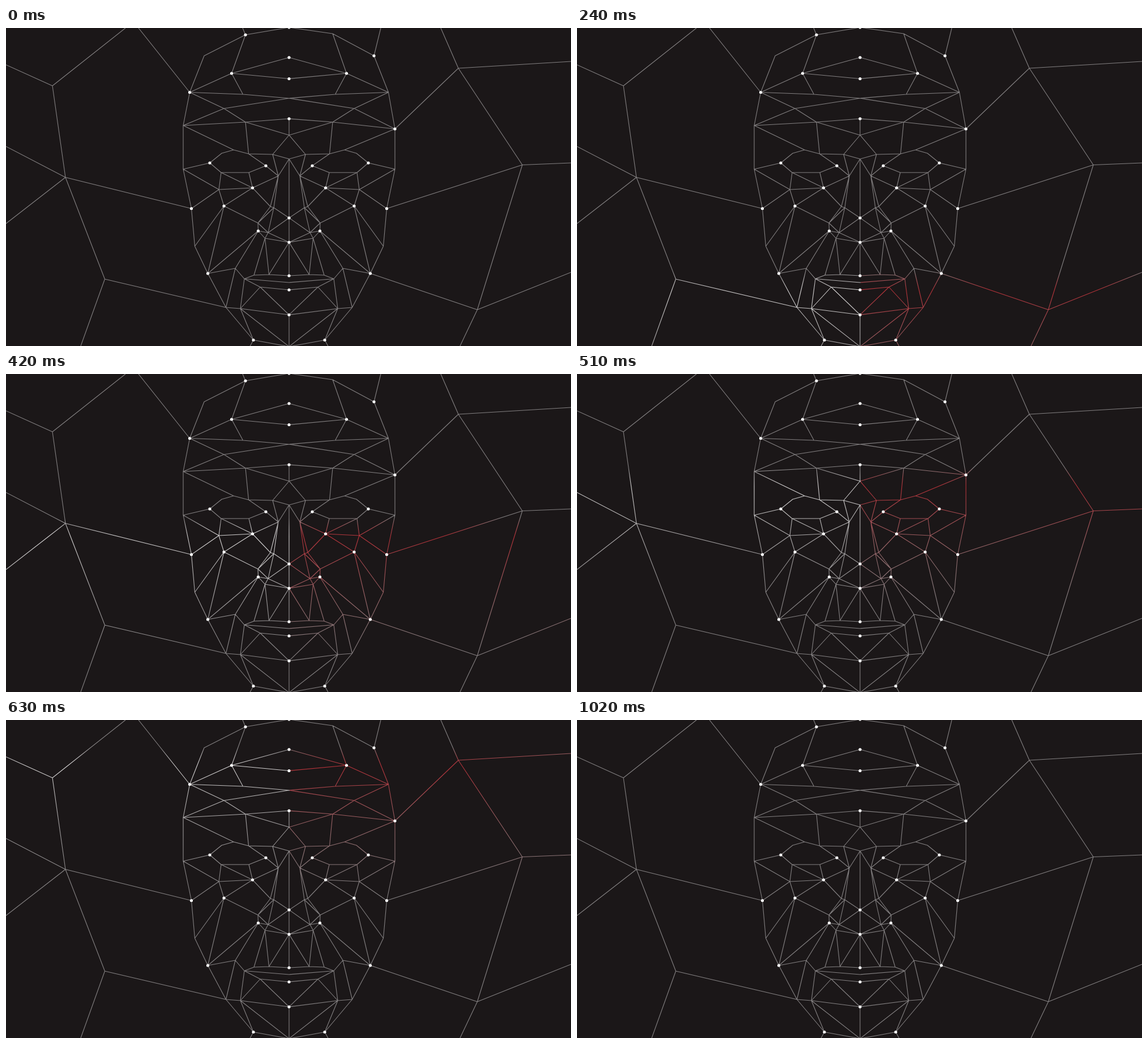
These frames come from a looping animation (998 px wide and 561 px high, 2280 ms). An HTML page with a canvas:

```html
<!DOCTYPE html>
<html lang="en">
<head>
<meta charset="utf-8">
<title>Face mesh scan</title>
<style>
  html, body { margin: 0; width: 100%; height: 100%; overflow: hidden; background: #1b1718; }
  canvas { display: block; }
</style>
</head>
<body>
<canvas id="stage" width="998" height="561"></canvas>
<script>
const W = 998, H = 561, MID = 500, LOOP = 2280, STEP = 30, TAIL = 265;
const ctx = document.getElementById('stage').getContext('2d');

// Heights of the points on the face's axis, named A to N
const axis = [-1, 52, 89.5, 124, 160, 189, 231, 335, 378, 437, 449, 462, 506, 562];

// Points beside the axis: distance from it, height, optional tilt between the sides
const half = {
  a: [77, 11, -1], b: [150, 49], c: [175.5, 113.5], d: [187, 175, 3], e: [187, 249],
  f: [172.5, 318.5], g: [166.5, 385], h: [143.5, 433], i: [111.5, 493], j: [63, 550.5],
  k: [101.5, 80], l: [81.5, 117], m: [115, 142], n: [77, 166], o: [71.5, 222],
  p: [29, 223], q: [98, 215], r: [119, 221], s: [140, 238], t: [41, 243],
  u: [120, 255], v: [71, 255], w: [124, 285], x: [64.5, 282], y: [115, 314],
  z: [19, 261], 0: [33, 315], 1: [27, 317], 2: [55, 344], 3: [54.5, 358],
  4: [37, 361], 5: [42.5, 371], 6: [35.5, 435], 7: [62, 436], 8: [79, 442.5],
  9: [95, 424], '+': [51, 457], '*': [86, 495], '~': [71, 565]
};

// Each word is one polyline through named points, drawn on both sides
const outline = 'Aabcdefghij~';
const forehead = 'ak ckB Ckl clDmd cmno dnE nFpo EF';
const eye = 'dqotzxwesrq suvt uwyxv ux wf pzGp';
const nose = 'x01H41z021 y2432 354I5 GJ';
const mouth = 'gyh39h 9i* 98 756I K876J 8*+L 8+M*jN* MN';
const faceLines = [outline, forehead, eye, nose, mouth].join(' ').split(' ');

function sidePoints(dir) {
  const pts = {};
  axis.forEach((y, i) => pts[String.fromCharCode(65 + i)] = [MID, y]);
  for (const [name, [dx, y, tilt = 0]] of Object.entries(half))
    pts[name] = [MID + dir * dx, y + dir * tilt];
  return pts;
}
const left = sidePoints(-1), right = sidePoints(1);

// Wide cells around the head, hung from six free nodes
const [P, Q, R] = [[82, 102], [105, 263.5], [174.5, 443]];
const [S, T, U] = [[799, 71], [912, 241.5], [832.5, 497]];
const web = [
  [[0, 65], P, [211, 0]], [P, Q, [0, 209]], [[0, 345], Q, left.f], [Q, R, [132, H]], [R, left.i],
  [[234, 0], left.c], [[418, 0], left.a], [[662, 0], right.b], [[768, 0], S, [W, 59]],
  [right.d, S, T, [W, 238]], [right.f, T, U, [W, 431]], [right.h, U, [802, H]]
];

const mesh = new Path2D(), knots = new Path2D();
const addLine = pts => pts.forEach(([x, y], i) => mesh[i ? 'lineTo' : 'moveTo'](x, y));

function addSide(pts, knotNames) {
  for (const line of faceLines) addLine([...line].map(n => pts[n]));
  for (const n of knotNames) {
    const [x, y] = pts[n];
    knots.moveTo(x + 2.6, y);
    knots.arc(x, y, 2.6, 0, 7);
  }
}
addSide(left, 'ABCEHIJLMkstxyf3hjac');
addSide(right, 'kstxyf3hjbd');
web.forEach(addLine);

const GREY = [131, 128, 129], WHITE = [216, 214, 214], RED = [184, 46, 54];

// Light below the front: quick rise, then a slow fall along the tail
const glow = d => Math.min(1, d * 9) * (1 - d) ** 1.6 * 1.2;

function strokeHalf(x, color, front) {
  const shade = ctx.createLinearGradient(0, front, 0, front + TAIL);
  for (let d = 0; d <= 1; d += 1 / 16) {
    const a = Math.min(1, glow(d));
    shade.addColorStop(d, `rgb(${GREY.map((g, i) => g + (color[i] - g) * a)})`);
  }
  ctx.save();
  ctx.beginPath();
  ctx.rect(x, 0, MID + 1, H);
  ctx.clip();
  ctx.strokeStyle = shade;
  ctx.stroke(mesh);
  ctx.restore();
}

function draw(now) {
  const t = Math.floor(now % LOOP / STEP) * STEP;
  const front = t >= 120 && t < 900 ? 665 - .98 * t : H + 9;
  ctx.fillStyle = '#1b1718';
  ctx.fillRect(0, 0, W, H);
  ctx.lineWidth = 1.1;
  ctx.lineJoin = 'round';
  strokeHalf(0, WHITE, front);
  strokeHalf(MID + 1, RED, front);
  ctx.fillStyle = '#fff';
  ctx.fill(knots);
}

let start;
function tick(now) {
  start ??= now;
  draw(now - start);
  requestAnimationFrame(tick);
}
draw(0);
requestAnimationFrame(tick);
</script>
</body>
</html>
```
